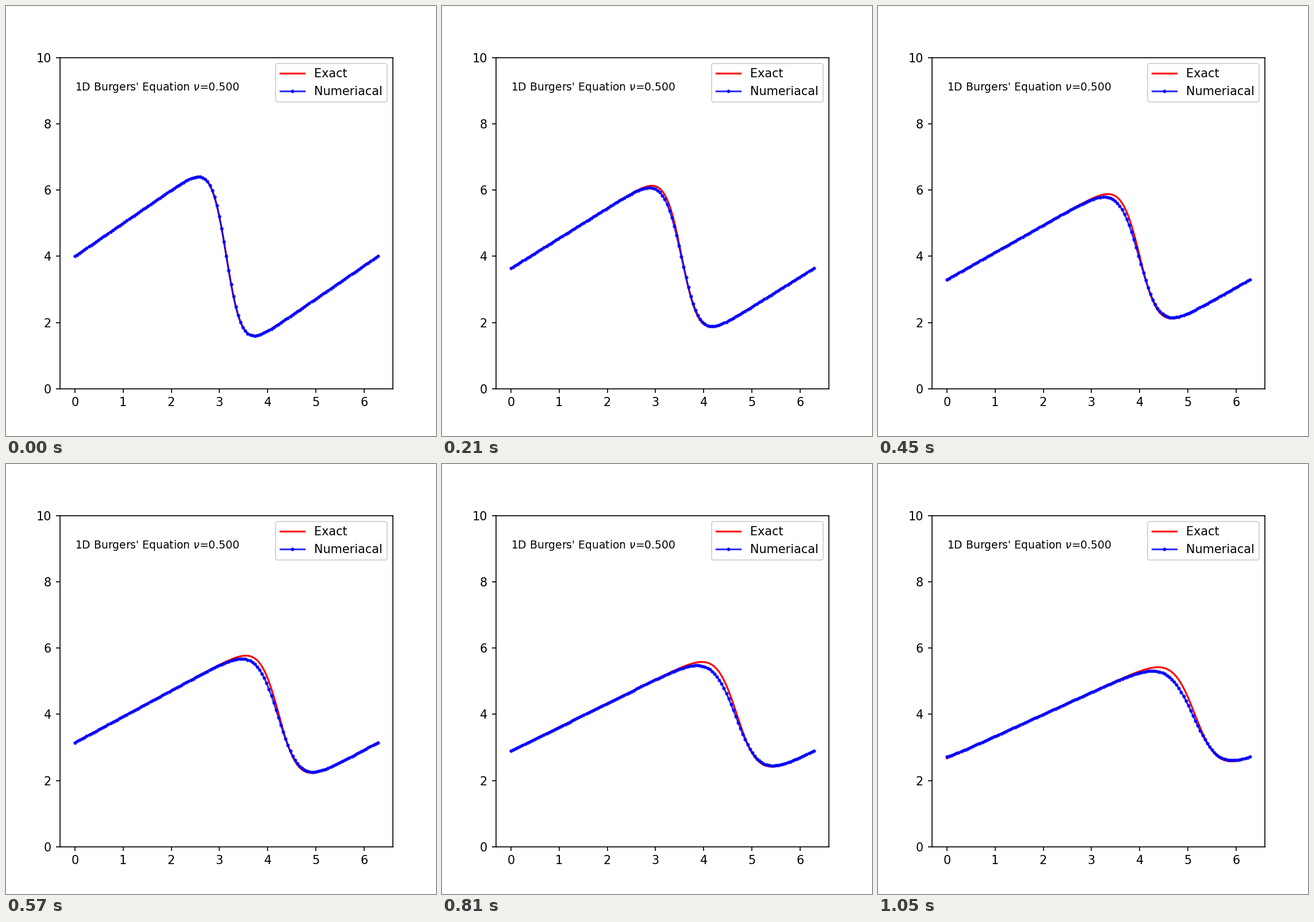
Write a matplotlib script that moves like this. It is 748 px wide and 748 px high and loops after 1.08 s.

```python
import numpy as np
import matplotlib.pyplot as plt
from matplotlib.animation import FuncAnimation

NU = 0.5
NX = 129
FRAMES = 36
STEPS = 10            # solver steps per frame
DT = 1 / 700

x = np.linspace(0, 2 * np.pi, NX)
dx = x[1] - x[0]


def exact(t):
    """Analytic solution built from two neighbouring Gaussian pulses."""
    width = 4 * NU * (t + 1)
    a = x - 4 * t
    b = a - 2 * np.pi
    ea, eb = np.exp(-a**2 / width), np.exp(-b**2 / width)
    return 4 + 4 * NU / width * (a * ea + b * eb) / (ea + eb)


def step(u):
    """Upwind convection, central diffusion, periodic ends."""
    v = u[:-1]
    left, right = np.roll(v, 1), np.roll(v, -1)
    v = (v - v * DT / dx * (v - left)
         + NU * DT / dx**2 * (right - 2 * v + left))
    return np.append(v, v[0])


def solve():
    u = exact(0)
    states = [u]
    for _ in range(FRAMES - 1):
        for _ in range(STEPS):
            u = step(u)
        states.append(u)
    return states


states = solve()

plt.rcParams["font.family"] = "DejaVu Sans"
fig, ax = plt.subplots(figsize=(5, 5), dpi=149.6)
red, = ax.plot(x, exact(0), color="red", lw=1.5, label="Exact")
blue, = ax.plot(x, states[0], "o-", color="blue", lw=1.5, ms=2,
                alpha=0.8, label="Numeriacal")
ax.set_ylim(0, 10)
ax.text(0, 9, rf"1D Burgers' Equation $\nu$={NU:.3f}", fontsize=9)
ax.legend(loc="upper right")


def update(i):
    red.set_ydata(exact(i * STEPS * DT))
    blue.set_ydata(states[i])
    return red, blue


anim = FuncAnimation(fig, update, frames=FRAMES, interval=30,
                     repeat=True, repeat_delay=0)
plt.show()
```
